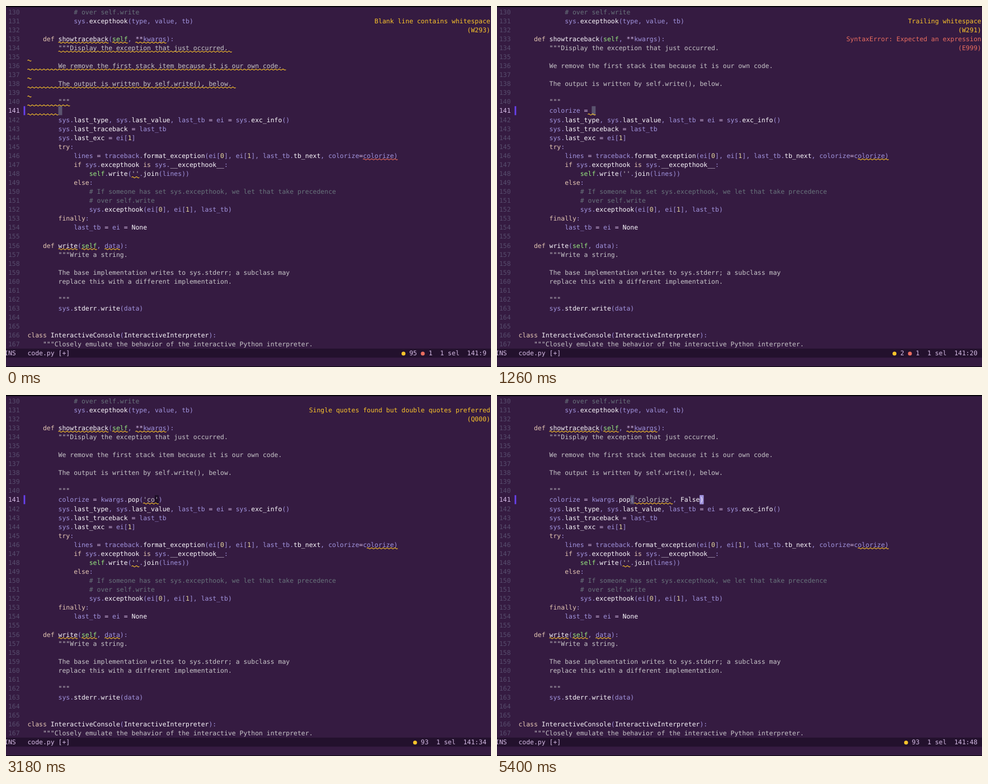
Animation of 867x646 px, one loop 5880 ms. Source, as an HTML page with a canvas:

```html
<!DOCTYPE html>
<html lang="en">
<head>
<meta charset="utf-8">
<title>Typing in a modal editor</title>
<style>
  html, body { margin: 0; width: 100%; height: 100%; overflow: hidden; background: #351b41; }
  canvas { display: block; }
</style>
</head>
<body>
<canvas id="screen" width="867" height="646"></canvas>
<script>
const ctx = document.getElementById('screen').getContext('2d');
const CELL = 6.894, ROW = 16.07, LEFT = 38.4, TOP = 2.5, COLS = 120;
const LOOP = 5880, TICK = 60, LINT_LAG = 90;
const FIRST_LINE = 130, EDIT_ROW = 11, INDENT = 8, STATUS_ROW = 38;
const color = {
  bg: '#351b41', bar: '#23112d', lineNo: '#574d6d', block: '#5b546f', diff: '#6842ee',
  plain: '#a194de', white: '#fbf8fd', lilac: '#d6bce6', almond: '#e6c8b4', mint: '#98ea80',
  silver: '#c8c6c9', comment: '#68737b', number: '#e6d99c', warn: '#fac42b', error: '#ea6d60'
};

const source = `            # over self.write
            sys.excepthook(type, value, tb)

    def showtraceback(self, **kwargs):
        """Display the exception that just occurred.

        We remove the first stack item because it is our own code.

        The output is written by self.write(), below.

        """

        sys.last_type, sys.last_value, last_tb = ei = sys.exc_info()
        sys.last_traceback = last_tb
        sys.last_exc = ei[1]
        try:
            lines = traceback.format_exception(ei[0], ei[1], last_tb.tb_next, colorize=colorize)
            if sys.excepthook is sys.__excepthook__:
                self.write(''.join(lines))
            else:
                # If someone has set sys.excepthook, we let that take precedence
                # over self.write
                sys.excepthook(ei[0], ei[1], last_tb)
        finally:
            last_tb = ei = None

    def write(self, data):
        """Write a string.

        The base implementation writes to sys.stderr; a subclass may
        replace this with a different implementation.

        """
        sys.stderr.write(data)


class InteractiveConsole(InteractiveInterpreter):
    """Closely emulate the behavior of the interactive Python interpreter.`.split('\n');

const typed = "colorize = kwargs.pop('colorize', False";
const OPEN = 22, QUOTE = 23, UNQUOTE = 32;   // key counts at which pairs open and close
// [time, keys pressed]; the pace is even between two points
const pace = [[60, 1], [870, 7], [1150, 11], [1950, 16], [3150, 25], [4140, 32], [4380, 33], [5300, 39]];

function keysAt(time) {
  if (time < pace[0][0]) return 0;
  for (let i = 1; i < pace.length; i++) {
    const [t0, k0] = pace[i - 1], [t1, k1] = pace[i];
    if (time < t1) return Math.floor(k0 + (k1 - k0) * (time - t0) / (t1 - t0));
  }
  return typed.length;
}

// Text of the edited line, with the automatically closed quote and bracket
function lineAfter(keys) {
  const quote = keys >= QUOTE && keys < UNQUOTE ? "'" : '';
  return typed.slice(0, keys) + quote + (keys >= OPEN ? ')' : '');
}

function lint(keys) {
  const text = typed.slice(0, keys);
  const warn = (message, code) => ({ message, code, tone: color.warn });
  const error = (message, code) => ({ message, code, tone: color.error });
  const undefinedName = name => error('Undefined name `' + name + '`', 'F821');
  const trailing = warn('Trailing whitespace', 'W291');
  const report = (warnings, errors, ...notes) => ({ warnings, errors, notes });
  if (!keys) return report(95, 1, warn('Blank line contains whitespace', 'W293'));
  if (keys <= 8) return report(94, 2,
    warn('Found useless expression. Either assign it to a variable or remove it.', 'B018'), undefinedName(text));
  if (keys === 9) return report(95, 2, trailing);
  const syntax = error('SyntaxError: Expected an expression', 'E999');
  if (keys === 10) return report(1, 1, syntax);
  if (keys === 11) return report(2, 1, trailing, syntax);
  if (keys < 17) return report(93, 1, undefinedName(text.slice(11)));
  if (keys === 18) return report(1, 1, error('SyntaxError: Expected an identifier', 'E999'));
  if (keys >= QUOTE && keys <= UNQUOTE)
    return report(93, 0, warn('Single quotes found but double quotes preferred', 'Q000'));
  if (keys > 34 && keys < 39) return report(93, 1, undefinedName(text.slice(34)));
  return report(93, 0);
}

const xOf = col => LEFT + col * CELL;
const yOf = row => TOP + row * ROW;

function write(text, col, row, tone) {
  ctx.fillStyle = tone;
  [...text].forEach((ch, i) => {
    if (ch !== ' ') ctx.fillText(ch, xOf(col + i), yOf(row) + 12.2);
  });
}

function block(col, row, tone) {
  ctx.fillStyle = tone;
  ctx.fillRect(xOf(col), yOf(row), CELL, ROW);
}

function curl(row, from, to, tone = color.warn) {
  ctx.strokeStyle = tone;
  ctx.beginPath();
  for (let col = from; col <= to + 0.01; col += 0.125)
    ctx.lineTo(xOf(col), yOf(row) + 14.8 - Math.sin(col * 2 * Math.PI));
  ctx.stroke();
}

const grammar = /(?<comment>#.*)|(?<silver>'[^']*'?)|(?<almond>\b(?:def|class|try|if|is|else|finally)\b)|(?<mint>\bself\b)|(?<number>\b\d+\b)|(?<white>(?<=\.)\w+|\w+(?=\()|\b[A-Z]\w*)|(?<lilac>[=*]+)|(?<plain>\w+|\S)/g;

function writeCode(text, col, row) {
  for (const token of text.matchAll(grammar)) {
    const kind = Object.keys(token.groups).find(name => token.groups[name]);
    write(token[0], col + token.index, row, color[kind]);
  }
}

function drawSource() {
  let inDoc = false;
  source.forEach((text, row) => {
    write(String(FIRST_LINE + row), -5, row, row === EDIT_ROW ? color.lilac : color.lineNo);
    const marks = text.includes('"""');
    if (inDoc || marks) write(text, 0, row, color.silver);
    else writeCode(text, 0, row);
    if (marks) inDoc = !inDoc;
  });
  ctx.fillStyle = color.diff;
  ctx.fillRect(xOf(-1), yOf(EDIT_ROW), 2.8, ROW);
}

function drawEdit(keys) {
  const text = lineAfter(keys), caret = INDENT + keys, under = text[keys];
  if (under === ')') {
    block(INDENT + OPEN - 1, EDIT_ROW, color.block);
    block(caret, EDIT_ROW, color.plain);
  } else block(caret, EDIT_ROW, under ? '#1f1028' : color.block);
  writeCode(text, INDENT, EDIT_ROW);
  if (under === ')') {
    block(caret, EDIT_ROW, color.plain);
    write(')', caret, EDIT_ROW, color.white);
  }
}

function drawCurls(keys, linted, report) {
  const broken = report.warnings < 10, caret = INDENT + keys;
  if (!broken) {
    [[3, 8, 21], [3, 22, 26], [3, 28, 36], [18, 27, 29], [26, 8, 13], [26, 14, 18], [26, 20, 24]]
      .forEach(span => curl(...span));
  }
  if (linted < 10) curl(16, 87, 96, color.error);
  else curl(16, 88, 96);
  if (!linted) {
    curl(4, 8, 53);
    for (let row = 5; row < 10; row++) curl(row, 0, source[row].length + 1);
    curl(10, 0, 11);
    curl(EDIT_ROW, 0, INDENT);
  } else if (linted < 9) curl(EDIT_ROW, INDENT, Math.min(caret, 16), color.error);
  else if (linted === 9) curl(EDIT_ROW, 16, 17);
  else if (linted === 11) curl(EDIT_ROW, 18, 20);
  else if (report.errors && !broken) curl(EDIT_ROW, linted < 17 ? 19 : 42, caret, color.error);
  if (linted >= QUOTE) curl(EDIT_ROW, 30, Math.min(caret + 1, 40));
}

function drawNotes(notes) {
  notes.forEach(({ message, code, tone }, i) => {
    [message, `(${code})`].forEach((text, j) => write(text, COLS - text.length, 1 + 2 * i + j, tone));
  });
}

function drawStatus(keys, { warnings, errors }) {
  ctx.fillStyle = color.bar;
  ctx.fillRect(0, yOf(STATUS_ROW), 867, ROW);
  write('INS', -6, STATUS_ROW, color.lilac);
  write('code.py [+]', 0, STATUS_ROW, color.lilac);
  const counts = `  ${warnings}` + (errors ? `   ${errors}` : '');
  const text = `${counts}  1 sel  141:${INDENT + keys + 1} `;
  const start = COLS - text.length;
  write(text, start, STATUS_ROW, color.lilac);
  const dot = (col, tone) => {
    ctx.fillStyle = tone;
    ctx.beginPath();
    ctx.arc(xOf(col + 0.5), yOf(STATUS_ROW) + 8.9, 3.5, 0, 2 * Math.PI);
    ctx.fill();
  };
  dot(start, color.warn);
  if (errors) dot(start + counts.length - String(errors).length - 2, color.error);
}

function draw(time) {
  const keys = keysAt(time), linted = keysAt(time - LINT_LAG), report = lint(linted);
  ctx.fillStyle = '#08040b';
  ctx.fillRect(0, 0, 867, 646);
  ctx.fillStyle = color.bg;
  ctx.fillRect(0, 2, 867, 643);
  drawSource();
  drawEdit(keys);
  drawCurls(keys, linted, report);
  drawNotes(report.notes);
  drawStatus(keys, report);
}

ctx.font = '11.45px "DejaVu Sans Mono", monospace';
ctx.textRendering = 'geometricPrecision';
ctx.lineWidth = 1.1;

let lastTick = -1;
function play() {
  const tick = Math.floor(performance.now() % LOOP / TICK);
  if (tick !== lastTick) draw(tick * TICK);
  lastTick = tick;
  requestAnimationFrame(play);
}
play();
</script>
</body>
</html>
```
